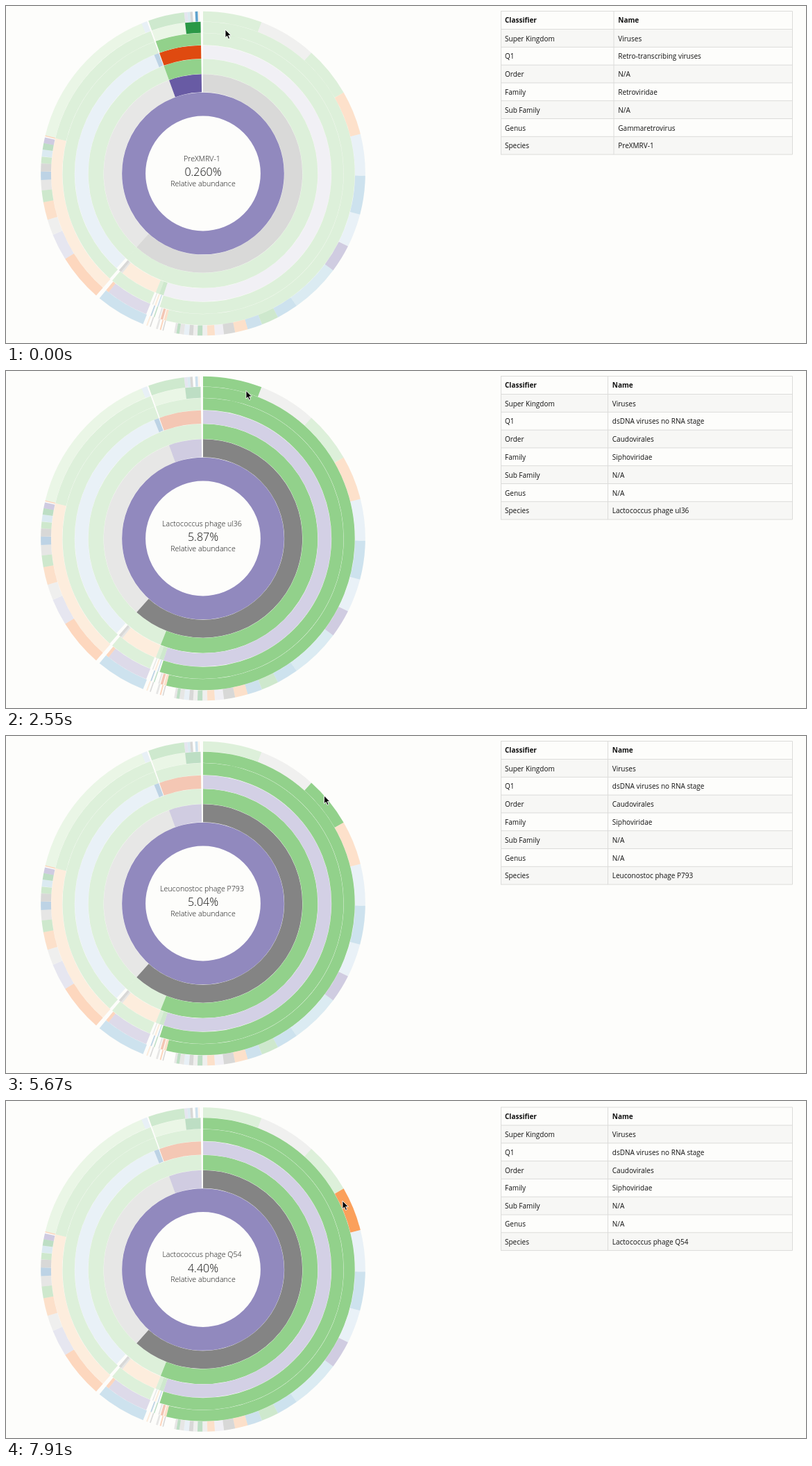
Recreate the animation shown at these times as an HTML page. Size 1153 by 486 pixels, loop 8 s.

```html
<!DOCTYPE html>
<html lang="en">
<head>
<meta charset="utf-8">
<title>Relative abundance</title>
<style>
html, body { margin: 0; width: 100%; height: 100%; overflow: hidden; background: #fdfdfb; }
svg { display: block; width: 100%; height: 100%; }
text { font: 10px "Open Sans", sans-serif; fill: #111; }
.head { font-weight: 700; }
.mid { font-size: 10.66px; font-weight: 300; text-anchor: middle; }
.big { font-size: 16px; }
</style>
</head>
<body>
<svg viewBox="0 0 1153 486" xmlns="http://www.w3.org/2000/svg">
  <g id="page"></g>
  <path id="cursor" d="M0 0V11.6L2.6 9.2 4.5 13.5 6.5 12.6 4.7 8.4H8.3Z" fill="#000" stroke="#fff" stroke-width=".9"/>
</svg>
<script>
const LOOP = 8000, CX = 284, CY = 241.5, R = 234;
const LEFT = 713, RIGHT = 1133.5, TOP = 7.5, HEAD = 26, ROW = 25.8;

// Four shades per hue, dark to light
const shades = {
  G: ['#2a9846', '#62b964', '#92d18b', '#bce3b4'],
  B: ['#2c73b2', '#5fa2cd', '#8dc0da', '#bbd3eb'],
  O: ['#df4a10', '#fc7e31', '#fba05b', '#fcc795'],
  P: ['#685ba4', '#9189be', '#b1b0d4', '#d3d0e5'],
  S: ['#535353', '#848484', '#b2b2b2', '#d2d2d2']
};

// Rings from the inside out: [shade, end angle, name]; '_' is a gap
const rings = [
  [['P2', 360, 'Viruses']],
  [['S2', 222, 'dsDNA viruses no RNA stage'], ['S3', 340], ['P1', 359.1, 'Retro-transcribing viruses']],
  [['G3', 201.7, 'Caudovirales'], ['G3', 222], ['G3', 340], ['G3', 359.1]],
  [['P4', 198, 'Siphoviridae'], ['G2', 200], ['G3', 201.7], ['O4', 219], ['S3', 219.8], ['S2', 221],
   ['_', 222.4], ['B4', 337.6], ['B1', 339.8], ['_', 340.1], ['O1', 359.1, 'Retroviridae']],
  [['G3', 198], ['_', 198.5], ['B2', 199], ['_', 199.6], ['O4', 200.2], ['_', 200.8], ['S3', 201.2],
   ['_', 202.2], ['G3', 220.3], ['_', 221.6], ['G3', 339.8], ['_', 340.3], ['G3', 359.1]],
  [['G3', 194.04], ['O3', 195], ['_', 195.3], ['O1', 196.3], ['_', 196.6], ['S3', 197.2], ['_', 198.6],
   ['G1', 199], ['_', 199.8], ['B1', 200.3], ['_', 202], ['P2', 218.5], ['O2', 219.7], ['_', 221.2],
   ['O4', 283.4], ['G3', 339.8], ['_', 340.3], ['G4', 353.2], ['G1', 359.1, 'Gammaretrovirus']],
  [['G3', 21.13, 'Lactococcus phage ul36'], ['S4', 41.9, 'Lactococcus phage TP901-1'],
   ['G3', 60.05, 'Leuconostoc phage P793'], ['O3', 75.9, 'Lactococcus phage Q54'],
   ['B4', 90.8], ['B2', 104.7], ['B4', 116.7], ['P1', 126.7], ['B3', 144.8], ['B2', 152.5],
   ['G2', 158.7], ['B2', 164], ['O3', 168.6], ['S2', 172.6], ['P4', 175.8], ['O3', 178.5],
   ['S4', 180.2], ['G1', 182], ['S4', 183.5], ['S2', 185], ['B4', 186.8], ['S3', 188.4],
   ['G1', 189.5], ['S3', 190.3], ['_', 194.1], ['S2', 194.5], ['_', 195], ['O2', 195.5],
   ['_', 196.2], ['S3', 196.9], ['_', 198.8], ['S2', 199.2], ['_', 200], ['O4', 200.5],
   ['_', 201.7], ['B2', 219.7], ['_', 221.2], ['O2', 238.2], ['P3', 247.8], ['S4', 253.4],
   ['O3', 259.8], ['G2', 264], ['S3', 267.7], ['B1', 270.7], ['S2', 273.6], ['G2', 276],
   ['B3', 278.5], ['G1', 280.8], ['P1', 282.9], ['_', 283.2], ['O2', 283.6], ['G4', 337.7],
   ['B4', 339.8], ['_', 340.3], ['G2', 353.3], ['P3', 354.4], ['B3', 355.4], ['S2', 356.3],
   ['_', 357.2], ['B2', 358.136, 'PreXMRV-1'], ['_', 358.4], ['O4', 358.7]]
];

// Pointer tip: [time, x, y]
const track = [[30, 316, 34], [730, 308, 72], [1710, 319.5, 34], [2300, 342, 28],
  [3430, 360, 30], [5670, 458.5, 86], [7590, 485, 144]];

const page = document.getElementById('page');
const cursor = document.getElementById('cursor');

function add(tag, attrs, text = '') {
  const el = document.createElementNS('http://www.w3.org/2000/svg', tag);
  for (const k in attrs) el.setAttribute(k, attrs[k]);
  el.textContent = text;
  return page.appendChild(el);
}
const line = (x1, y1, x2, y2) => add('path', { d: `M${x1} ${y1}L${x2} ${y2}`, stroke: '#dcdcda' });
const label = (x, y, text, cls = '') => add('text', { x, y, class: cls }, text);
const radius = k => R * Math.sqrt(k / 8);

// Sunburst
const arcs = rings.map((ring, i) => {
  const r0 = radius(i + 1), r1 = radius(i + 2);
  let start = 0;
  return ring.map(([shade, end, name = 'N/A']) => {
    const arc = { start, end, name, ring: i };
    start = end;
    if (shade !== '_') arc.el = add('circle', {
      cx: CX, cy: CY, r: (r0 + r1) / 2, fill: 'none', pathLength: 360,
      stroke: shades[shade[0]][shade[1] - 1], 'stroke-width': r1 - r0 - .3,
      'stroke-dasharray': `${end - arc.start} 360`,
      transform: `rotate(${arc.start - 90} ${CX} ${CY})`
    });
    return arc;
  });
});
const title = label(282.5, 223.5, '', 'mid');
const share = label(CX, 245, '', 'mid big');
label(CX, 259.5, 'Relative abundance', 'mid');

// Table
const levels = ['Super Kingdom', 'Q1', 'Order', 'Family', 'Sub Family', 'Genus', 'Species'];
const rowY = i => TOP + HEAD + i * ROW;
const bottom = rowY(7);
for (let i = 0; i < 7; i += 2)
  add('rect', { x: LEFT, y: rowY(i), width: RIGHT - LEFT, height: ROW, fill: '#f7f7f5' });
[TOP, ...levels.map((_, i) => rowY(i)), bottom].forEach(y => line(LEFT, y, RIGHT, y));
[LEFT + .5, RIGHT].forEach(x => line(x, TOP, x, bottom));
const divider = line(0, TOP, 0, bottom);
label(719, 24.3, 'Classifier', 'head');
const nameHead = label(0, 24.3, 'Name', 'head');
const cells = levels.map((text, i) => {
  label(719, rowY(i) + 17, text);
  return label(0, rowY(i) + 17, '');
});

const at = (ring, deg) => arcs[ring].find(a => deg >= a.start && deg < a.end);

function pointer(t) {
  const n = track.findIndex(p => p[0] > t);
  if (n < 0) return track[track.length - 1].slice(1);
  if (!n) return track[0].slice(1);
  const [a, b] = [track[n - 1], track[n]], f = (t - a[0]) / (b[0] - a[0]);
  return [a[1] + (b[1] - a[1]) * f, a[2] + (b[2] - a[2]) * f];
}

function hovered(t, x, y) {
  if (t < 30) return at(6, 357.6);
  const dx = x - CX, dy = y - CY;
  const deg = (Math.atan2(dx, -dy) * 180 / Math.PI + 360) % 360;
  const ring = Math.floor(8 * (dx * dx + dy * dy) / (R * R)) - 1;
  return at(Math.min(6, ring), deg);
}

let shown;
function select(arc) {
  if (arc === shown) return;
  shown = arc;
  const mid = (arc.start + arc.end) / 2;
  const chain = arcs.slice(0, arc.ring + 1).map((_, i) => at(i, mid));
  arcs.flat().forEach(a => a.el && a.el.setAttribute('opacity', chain.includes(a) ? 1 : .3));
  title.textContent = arc.name;
  share.textContent = ((arc.end - arc.start) / 3.6).toPrecision(3) + '%';
  const x = mid > 340 ? 876 : 867.5;
  divider.setAttribute('d', `M${x} ${TOP}V${bottom}`);
  [nameHead, ...cells].forEach(c => c.setAttribute('x', x + 6.3));
  cells.forEach((c, i) => c.textContent = chain[i] ? chain[i].name : '');
}

function frame(now) {
  const t = now % LOOP, [x, y] = pointer(t);
  select(hovered(t, x, y));
  cursor.setAttribute('transform', `translate(${x} ${y})`);
  // The page is pulled down slightly at the end
  const pull = Math.max(0, Math.min(1, (t - 7590) / 320));
  page.setAttribute('transform', `translate(0 ${1.5 * pull})`);
  requestAnimationFrame(frame);
}
requestAnimationFrame(frame);
</script>
</body>
</html>
```
